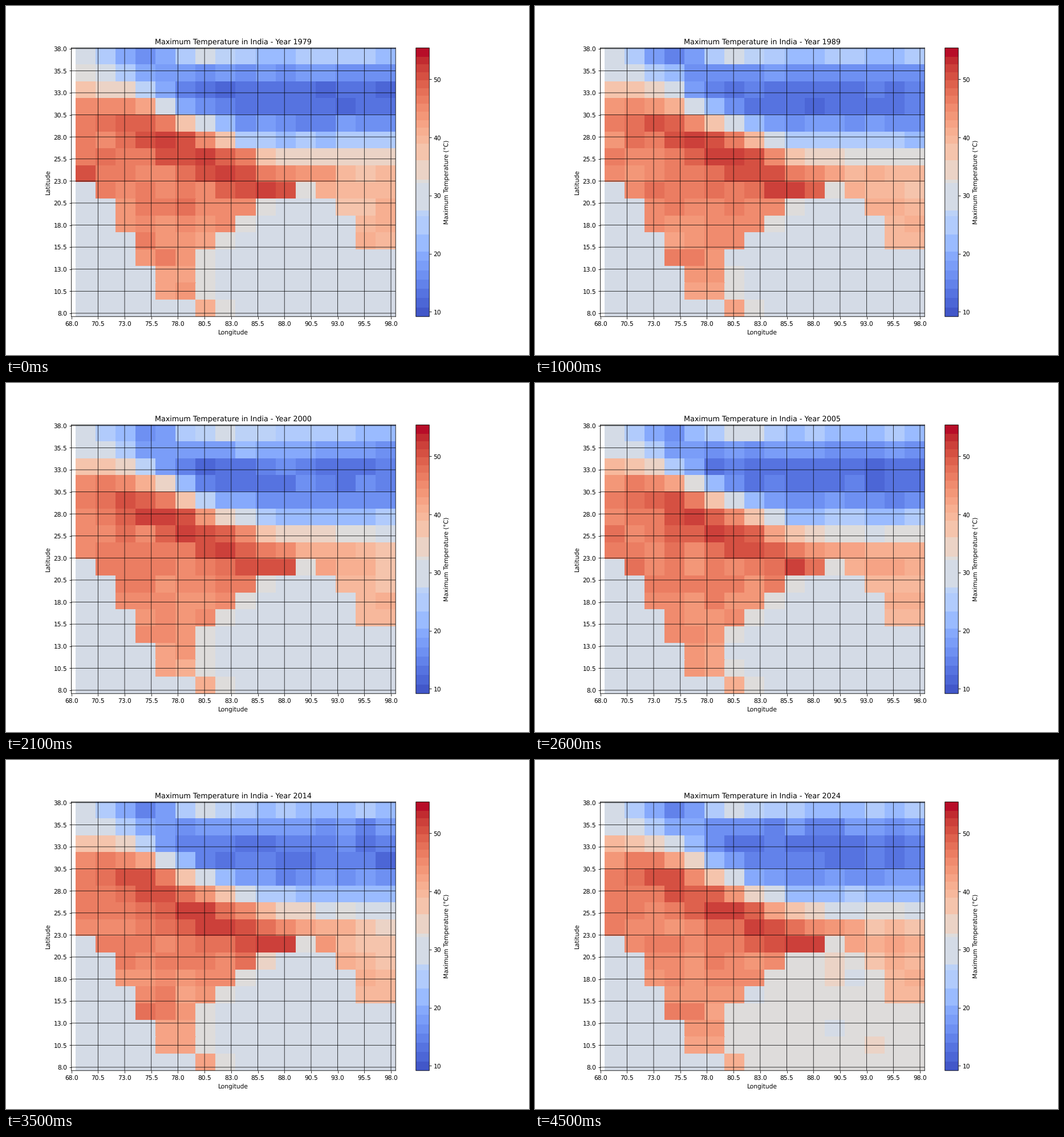
These frames come from a looping animation (917 px wide and 611 px high, 4.6 s). A matplotlib script:

```python
import numpy as np
import matplotlib.pyplot as plt
from matplotlib.animation import FuncAnimation
from matplotlib.colors import ListedColormap

W, H = 917, 611
DPI = W / 12
FIRST, LAST = 1979, 2024
VMIN, VMAX = 9.18, 55.42
N = 16
LON0, DLON = 68.4375, 1.875
LAT0, DLAT = 38.095, 1.90475
SEA = 30
WARM_BAY = (2010, 2024)

plt.rcParams.update({"text.hinting": "none", "path.snap": False})
row, col = np.mgrid[0:N, 0:N]


def bump(x, y, amp, sx, sy):
    return amp * np.exp(-((col - x) / sx) ** 2 / 2 - ((row - y) / sy) ** 2 / 2)


def step(x, width):
    return 1 / (1 + np.exp(-x / width))


def land_mask():
    south = row - 8
    peninsula = (col >= 1 + south / 2) & (col <= 5 + 5 * np.exp(-south / 2.2))
    east = (col >= 11.8 + 0.72 * south) & (row < 12)
    island = (row == 15) & (col == 6)
    return (row < 8) | (peninsula & (row < 15)) | east | island


def mean_field():
    # Hot plains meet the cold plateau along a front that drifts east
    hot = 31 + 15 * step(row - 2, 0.5) - 0.6 * np.maximum(row - 8, 0)
    cold = np.minimum(13.4 + 1.55 * (row - 2.5) ** 2, 40)
    front = np.minimum(0.9 + 0.95 * row + 0.06 * row ** 2, 10.8)
    field = cold + (hot - cold) * step(front - col, 0.65)

    # Hottest belt, running south-east
    belt = np.exp(-((row - 2.8 - 0.57 * col) / 0.8) ** 2 / 2)
    field += 6 * belt * np.exp(-((col - 5.2) / 4.2) ** 4)

    # Mountain trough and ridge in the top row, two hot coasts
    for x, y, amp in [(3, 0, -8), (6.2, 0, 5.5), (10, 8, 5), (3, 12, 2.5)]:
        field += bump(x, y, amp, 1.1, 0.4)

    shelf = np.roll(land, 1, axis=1) & (col > 0)
    return np.where(land, field, SEA + 2.5 * shelf)


def temperature(year):
    rng = np.random.default_rng(year)
    spells = zip(rng.uniform(0, N, 6), rng.uniform(0, 11, 6),
                 rng.normal(0, 2, 6))
    change = sum(bump(x, y, amp, 0.8, 0.8) for x, y, amp in spells)
    noise = rng.normal(0, 1, (N, N))
    field = mean + np.where(land, change + 0.8 * noise, 0.2 * noise)
    if year in WARM_BAY:
        bay = ~land & (col > 5)
        field[bay] = SEA + 2.5 + 0.2 * noise[bay]
    return np.clip(field, VMIN, VMAX)


def banded_map():
    edges = np.r_[np.arange(VMIN, 21, 1.6), 23.3, 26.5, 27.5, 32.2, 32.8, 36.2,
                  np.linspace(39, VMAX, 13)]
    tones = edges[:-1] + 0.7 * np.diff(edges)
    temps = np.linspace(VMIN, VMAX, 512)
    band = np.clip(np.searchsorted(edges, temps) - 1, 0, len(tones) - 1)
    return ListedColormap(plt.cm.coolwarm((tones[band] - VMIN) / (VMAX - VMIN)))


land = land_mask()
mean = mean_field()

fig, ax = plt.subplots(figsize=((W + 0.01) / DPI, (H + 0.01) / DPI), dpi=DPI)
steps = np.arange(N + 1)
lon, lat = LON0 + DLON * steps, LAT0 - DLAT * steps
mesh = ax.pcolormesh(lon, lat, temperature(FIRST), cmap=banded_map(),
                     vmin=VMIN, vmax=VMAX)
fig.colorbar(mesh, ax=ax, label="Maximum Temperature (°C)")
ax.set_xticks(np.arange(68, 98.1, 2.5))
ax.set_yticks(np.arange(8, 38.1, 2.5))
ax.set_xlim(68, lon[-1])
ax.set_ylim(lat[-1], lat[0])
ax.grid(True, color="black", linewidth=0.7)
ax.set_xlabel("Longitude")
ax.set_ylabel("Latitude")
title = ax.set_title("")


def update(i):
    year = FIRST + i
    mesh.set_array(temperature(year))
    title.set_text(f"Maximum Temperature in India - Year {year}")
    return mesh, title


anim = FuncAnimation(fig, update, frames=LAST - FIRST + 1, interval=100,
                     repeat=True, repeat_delay=0)
plt.show()
```
